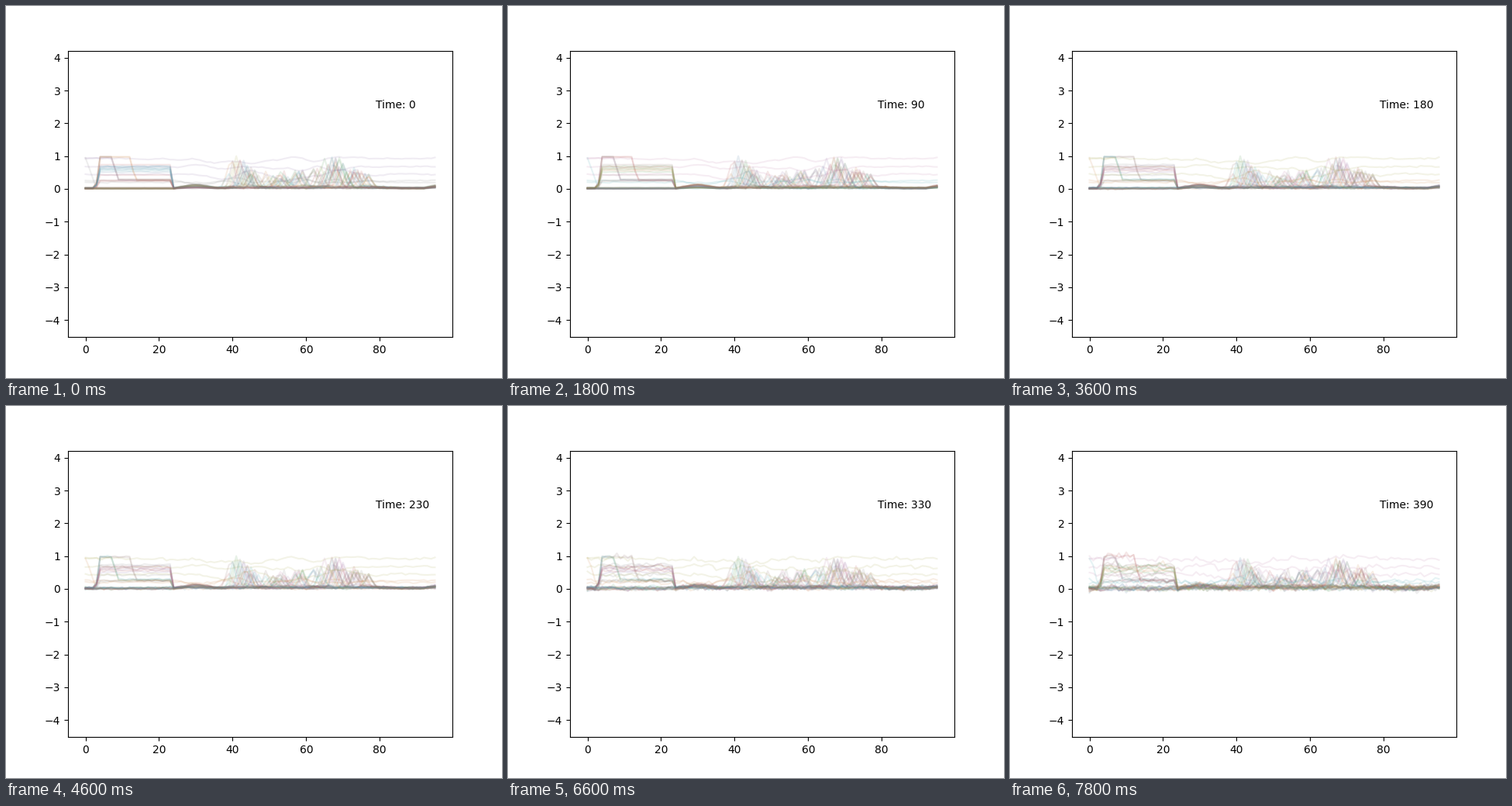
Recreate the animation shown at these times as a matplotlib script. Size 640 by 480 pixels, loop 8000 ms.

```python
import matplotlib.pyplot as plt
import numpy as np
from matplotlib.animation import FuncAnimation
from matplotlib.colors import to_rgb

FRAMES, STEP, N = 40, 10, 38
X = np.arange(96)
rng = np.random.default_rng(7)


def ramp(a, b):
    """0 before a, 1 after b, straight in between."""
    return np.clip((X - a) / (b - a), 0, 1)


def plateau(level, fall=23):
    return level * ramp(2.8, 4) * (1 - ramp(fall, fall + 1))


def two_step(high, fall, low):
    return (high - low) * ramp(2.8, 4) * (1 - ramp(fall, fall + 1.6)) + plateau(low)


def quiet():
    """Low activity: a hump after the drop, a busy midday, a late rise."""
    hump = np.exp(-((X - 30) / 4) ** 2) * (X > 24)
    busy = ramp(36, 40) * (1 - ramp(78, 86))
    shape = hump * rng.uniform(0.3, 1.8) + (0.3 + busy) * ramp(24, 26) * rng.random(96)
    return rng.uniform(0, 0.04) + rng.uniform(0.01, 0.08) * (shape + ramp(92, 95))


def bursts(count):
    """Narrow midday peaks, tallest around 42 and 67."""
    y = np.zeros(96)
    for c in rng.integers(39, 78, count):
        top = 0.5 + 0.5 * max(np.exp(-((c - 42) / 3) ** 2), np.exp(-((c - 67) / 5) ** 2))
        peak = top * rng.uniform(0.5, 1) * (1 - abs(X - c) / rng.uniform(1.5, 2.6))
        y = np.maximum(y, peak)
    return y


def wander(level):
    """Slow drift about a level, bounded by 1, with more swing at midday."""
    drift = np.convolve(rng.normal(0, 1, 104), np.hanning(11) / 5, "same")[4:-4]
    swing = 0.02 + 0.16 * ramp(23, 30) * (1 - ramp(70, 84))
    return np.clip(level + swing * drift, 0, 0.98) + rng.normal(0, 0.008, 96)


def curves():
    c = np.array([quiet() + (bursts(4) if i % 10 != 6 else 0) for i in range(N)])

    blues = [i for i in range(N) if i % 10 in (0, 9)]
    for i, level in zip(blues, np.linspace(0.5, 0.68, len(blues))):
        c[i] += plateau(level) + plateau(1) * rng.normal(0, 0.008, 96)
    for i, level in zip(range(3, N, 10), (0.42, 0.22, 0.72, 0.25)):
        c[i] += plateau(level)
    for i in (1, 11):
        c[i] += two_step(0.95, 12, 0.24)
        c[i + 4] += two_step(0.95, 7.2, 0.26)

    for i, level in zip((4, 14, 24, 7, 27), (0.92, 0.67, 0.44, 0.25, 0.2)):
        c[i] = wander(level)
    c[17] = 0.01 + 0.95 * (1 - ramp(0, 3)) + rng.normal(0, 0.008, 96)
    c[34] += 0.93 * (1 - ramp(7, 9)) + 0.25 * ramp(7, 9) * (1 - ramp(23, 24))
    return c


def muted(i, grey=0.4):
    """Cycle colour drawn toward a middle grey."""
    return (1 - grey) * np.array(to_rgb(f"C{i % 10}")) + grey * 0.5


sigma = 0.045 * (np.arange(FRAMES) / (FRAMES - 1)) ** 2
kick = np.sqrt(np.diff(sigma ** 2, prepend=0))
base = curves()
noise = np.cumsum(kick[:, None, None] * rng.normal(size=(FRAMES, N, 96)), axis=0)

fig, ax = plt.subplots(figsize=(6.4, 4.8), dpi=100)
ax.set_xlim(-4.75, 99.75)
ax.set_ylim(-4.52, 4.215)
lines = [ax.plot(X, row, alpha=0.13)[0] for row in base]
label = ax.text(0.8, 0.8, "", transform=ax.transAxes)


def draw(k):
    for i, line in enumerate(lines):
        line.set_ydata(base[i] + noise[k, i])
        line.set_color(muted(i + N * k))
    label.set_text(f"Time: {k * STEP}")
    return [*lines, label]


anim = FuncAnimation(fig, draw, frames=FRAMES, interval=200, repeat=True, repeat_delay=0)
plt.show()
```
